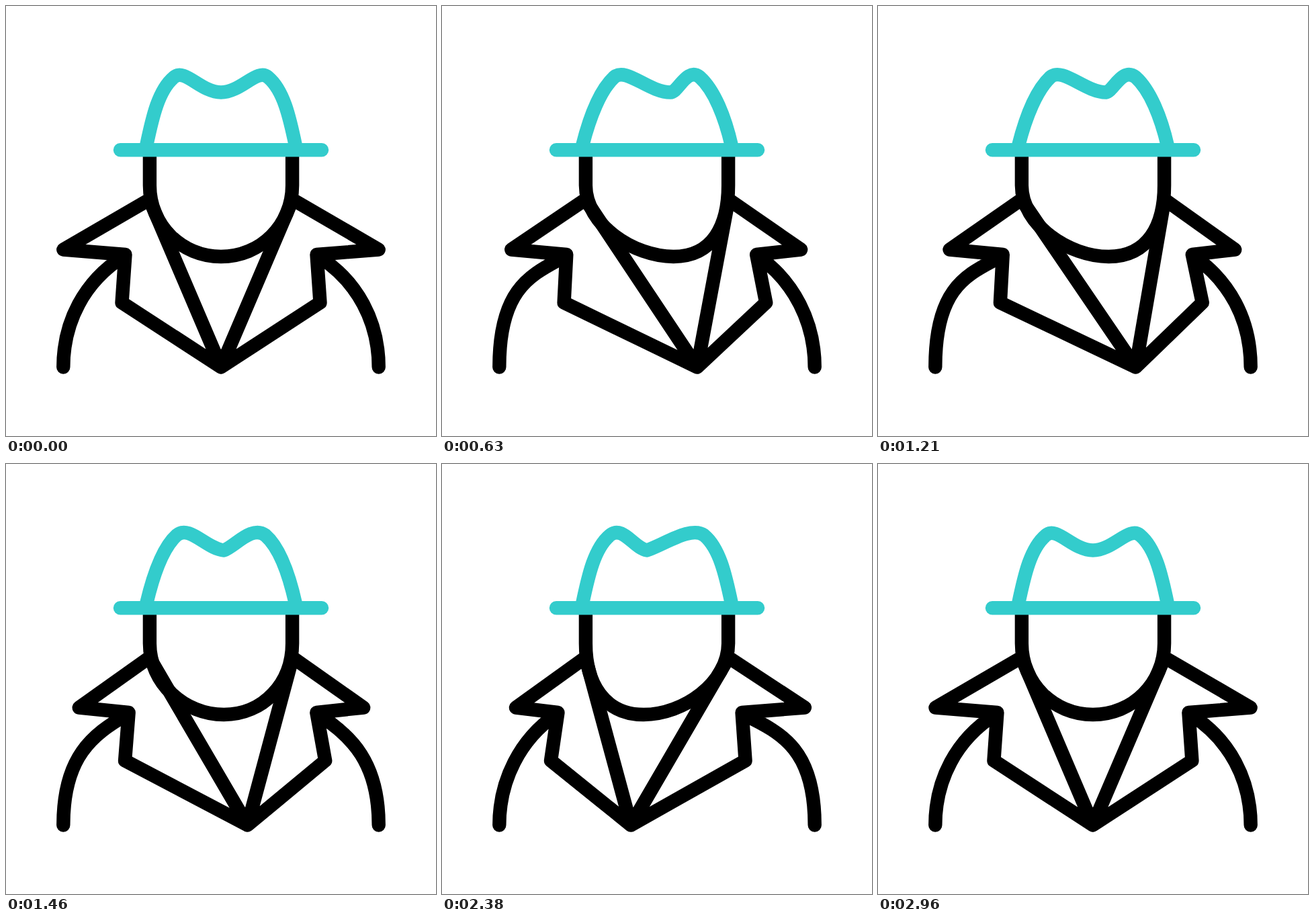
Recreate the animation shown at these times as an HTML page. Size 640 by 640 pixels, loop 3000 ms.

```html
<!DOCTYPE html>
<html lang="en">
<head>
<meta charset="utf-8">
<title>Detective</title>
<style>
  html, body { margin: 0; height: 100%; overflow: hidden; background: #fff; }
  svg { display: block; width: 100vw; height: 100vh; }
  path { fill: none; stroke: #000; stroke-width: 20.4; stroke-linecap: round; stroke-linejoin: round; }
  .hat { stroke: #33cccc; }
</style>
</head>
<body>
<svg viewBox="0 0 640 640">
  <path id="body"/>
  <path id="face"/>
  <path id="crown" class="hat"/>
  <path class="hat" d="M170 214.2H470"/>
</svg>
<script>
const SECOND = 1000;

// Easing handles for the turns front > right > left > front.
const headEase = [[.25, .32], [.45, .56], [.45, .56]];
const bodyEase = [[.25, .35], [.6, .75], [.5, .68]];

// Cubic easing with flat ends, solved for time by bisection.
function ease(t, [x1, x2]) {
  let lo = 0, hi = 1, s;
  for (let i = 0; i < 24; i++) {
    s = (lo + hi) / 2;
    const x = 3 * x1 * s * (1 - s) ** 2 + 3 * x2 * s * s * (1 - s) + s ** 3;
    if (x < t) lo = s; else hi = s;
  }
  return s * s * (3 - 2 * s);
}

// How far the figure is turned right and left, each from 0 to 1.
function turned(seconds, handles) {
  const step = Math.floor(seconds);
  const p = ease(seconds - step, handles[step]);
  return [[p, 0], [1 - p, p], [0, 1 - p]][step];
}

// side is -1 for the left and 1 for the right; away is the turn to the other side.
function arm(side, notch, away) {
  const x = d => 320 + side * d;
  return `M${x(234.7)} 537.5C${x(234.7)} ${470 - 60 * away} ` +
    `${x(203.5 - 21 * away)} ${410 - 12 * away} ${notch - side * -3} 373`;
}

function lapel(side, tip, notch, corner, apex) {
  return `M${320 + side * 106.5} 288L${tip} 362.5 ${notch} 370 ${corner} 441.5 ${apex} 537.5Z`;
}

function body([r, l], [headR, headL]) {
  const apex = 320 + 69 * r - 50 * l;
  const notchL = 177.5 + 9 * r - 6.5 * l;
  const notchR = 462.5 + 6.5 * r - 20.5 * l;
  return arm(-1, notchL, headR) + arm(1, notchR, headL) +
    lapel(-1, 85.3 + 20.7 * r + 31.7 * l, notchL, 172.5 + 10.5 * r - 13.5 * l, apex) +
    lapel(1, 554.7 - 23.7 * r - 19 * l, notchR, 467.5 + 17 * r - 20.5 * l, apex);
}

function face([r, l]) {
  const chin = 320 + 28 * (r - l);
  return `M213.9 214V267C213.9 326 ${chin - 59} 373 ${chin} 373S426.1 326 426.1 267V214`;
}

function crown([r, l]) {
  const dent = 320 + 23 * r - 21 * l;
  const left = 250 + 7 * r, right = 390 - 7 * r;
  return `M209 208C${218 + 2 * r} 165 ${left - 23 + 3 * r} 125 ${left} 106` +
    `C${left + 16 + 2 * r + 4 * l} ${92 - 2 * (r + l)} ` +
    `${dent - 30 - 3 * r + 15 * l} ${128.5 - 4.5 * l} ${dent} 128.5` +
    `C${dent + 30 - 21 * r - 4 * l} ${128.5 - 13.5 * l} ` +
    `${right - 16 - 4 * (r + l)} ${92 - 2 * r} ${right} 106` +
    `C${right + 23 - 2 * r} 125 ${422 - r} 165 431 208`;
}

function show(id, d) {
  document.getElementById(id).setAttribute('d', d);
}

const start = performance.now();
function tick() {
  const seconds = (performance.now() - start) / SECOND % 3;
  const head = turned(seconds, headEase);
  show('body', body(turned(seconds, bodyEase), head));
  show('face', face(head));
  show('crown', crown(head));
  requestAnimationFrame(tick);
}
tick();
</script>
</body>
</html>
```
